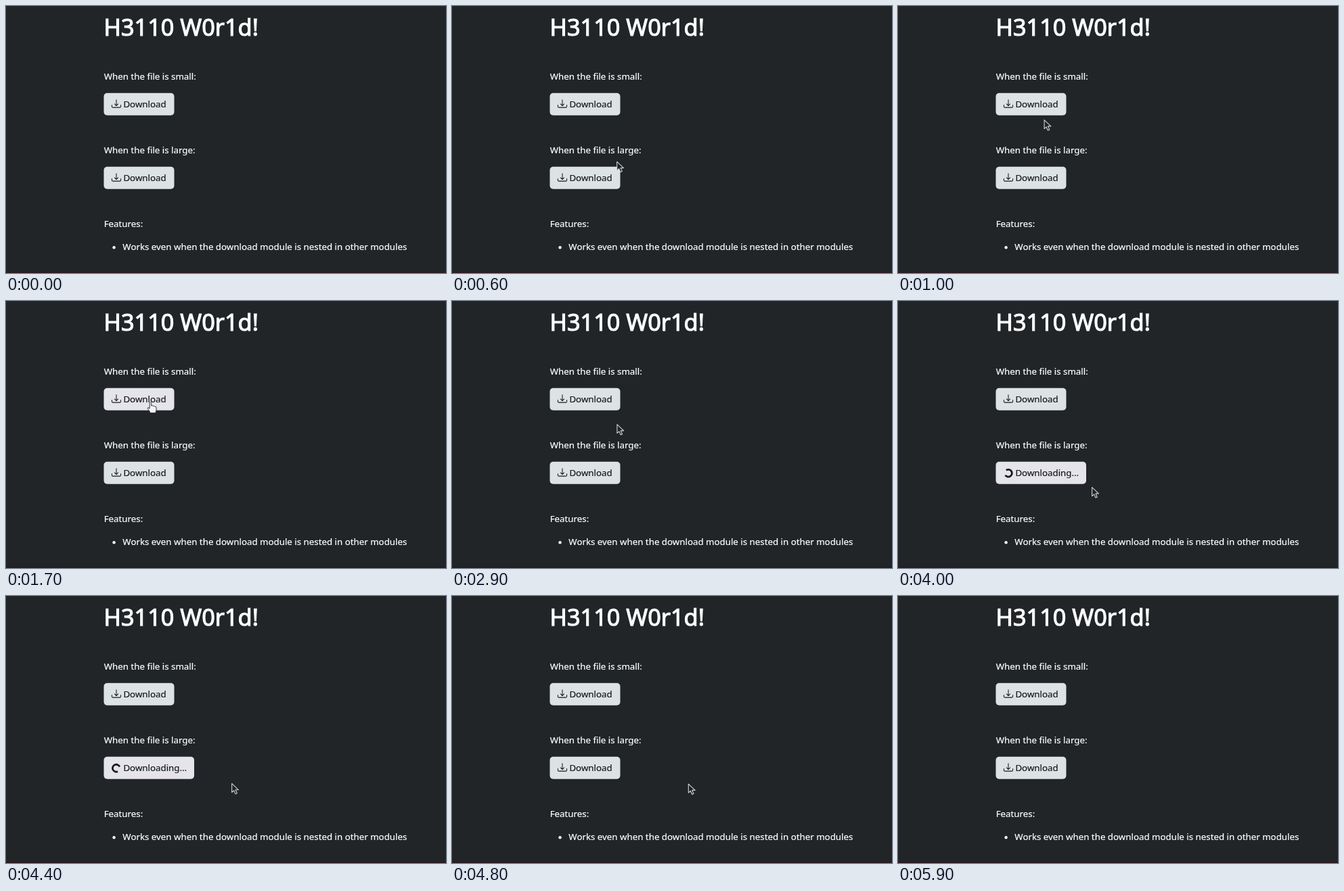
Animation of 650x395 px, one loop 6300 ms. Source, as an HTML page:

```html
<!DOCTYPE html>
<html lang="en">
<head>
<meta charset="utf-8">
<title>Download buttons</title>
<style>
  html, body { margin: 0; width: 100%; height: 100%; overflow: hidden; background: #212528; }
  svg { display: block; width: 650px; height: 395px; }
  text { font: 13.3px "Noto Sans", "Open Sans", sans-serif; fill: #fff; stroke: #fff; stroke-width: .2px; }
  .title { font-size: 34.3px; font-weight: 500; stroke-width: 1.1px; }
  .button text { fill: #181b1e; stroke: #181b1e; }
  .icon { fill: none; stroke: #181b1e; stroke-width: 1.2; stroke-linecap: round; stroke-linejoin: round; }
  .spinner { fill: none; stroke: #181b1e; stroke-width: 2.8; }
</style>
</head>
<body>
<svg viewBox="0 0 650 395">
  <defs>
    <g id="icon" class="icon" transform="translate(156 -7.5) scale(.875)">
      <path d="M.5 10.4v2.5a1.5 1.5 0 0 0 1.5 1.5h12a1.5 1.5 0 0 0 1.5-1.5v-2.5"/>
      <path d="M8 1.5v9.8M5 8.5l3 3 3-3"/>
    </g>
  </defs>
  <rect width="650" height="395" fill="#212528"/>
  <rect y="393" width="650" height="2" fill="#291b21"/>
  <text class="title" x="144.5" y="44.2">H3110 W0r1d!</text>
  <text x="144.7" y="109.2">When the file is small:</text>
  <text x="144.7" y="218.2">When the file is large:</text>
  <text x="144.7" y="327.2">Features:</text>
  <circle cx="159.6" cy="357.2" r="2.2" fill="#fff"/>
  <text x="172.3" y="361.4">Works even when the download module is nested in other modules</text>
  <g id="buttons"></g>
  <g id="cursor">
    <path id="arrow" d="M.6.6V13.6L3.6 10.9 5.9 16 8.3 14.9 6 9.9H10.4Z"
      fill="#212427" stroke="#d0d2d3" stroke-width="1.1" stroke-linejoin="round"/>
    <path id="hand" d="M-1.3.9Q0-1 1.2.9V5.6Q2.6 4 3.8 6 5.2 5 6.2 6.8 8.5 6 8.5 8V11.4Q8.5 13.2 7.3 16H-.6Q-.7 13.8-4.2 9.7-4.6 7.4-2.2 8.6L-1.3 9.7Z"
      fill="#f6f6f8" stroke="#34373b" stroke-linejoin="round"/>
  </g>
</svg>
<script>
const LOOP = 6300, STEP = 100;

// The pointer reaches each stop at `at` and stays until `leave`.
const stops = [
  { at: 300, x: 300, y: 357 },
  { at: 1000, x: 215.5, y: 168 },
  { at: 1300, leave: 2800, x: 213.5, y: 149.5 },
  { at: 2900, x: 243.3, y: 182 },
  { at: 3400, leave: 3700, x: 229, y: 249 },
  { at: 4000, x: 286, y: 275 },
  { at: 4800, leave: 5500, x: 348.7, y: 277.5 },
  { at: 5900, x: 374, y: 400 }
];

const rows = [
  { y: 145, from: 1800, to: 2100 },
  { y: 254, from: 3800, to: 4800 }
];

const $ = id => document.getElementById(id);
const show = (el, on) => el.setAttribute("visibility", on ? "visible" : "hidden");
const easeOut = k => k * (2 - k);

for (const row of rows) {
  $("buttons").insertAdjacentHTML("beforeend", `
    <g class="button" transform="translate(0 ${row.y})">
      <rect x="144.5" y="-16.2" width="104" height="33" rx="5"/>
      <use href="#icon"/>
      <path class="spinner" d="M166.7 -3.1A5.4 5.4 0 1 0 166.7 4.5"/>
      <text x="173.4" y="5"></text>
    </g>`);
  const g = $("buttons").lastElementChild;
  row.box = g.querySelector("rect");
  row.icon = g.querySelector("use");
  row.spinner = g.querySelector("path");
  row.label = g.querySelector("text");
}

function pointerAt(t) {
  const i = stops.findIndex(s => s.at > t);
  if (i < 1) return null;
  const a = stops[i - 1], b = stops[i], leave = a.leave || a.at;
  const k = easeOut(Math.max(0, (t - leave) / (b.at - leave)));
  return { x: a.x + (b.x - a.x) * k, y: a.y + (b.y - a.y) * k };
}

function draw(t) {
  const p = pointerAt(t);
  let over = false;
  for (const row of rows) {
    const busy = t >= row.from && t < row.to;
    const width = busy ? 133.5 : 104;
    const hover = p && p.x > 144 && p.x < 144 + width && Math.abs(p.y - row.y) < 17;
    over = over || hover;
    row.box.setAttribute("width", width);
    row.box.setAttribute("fill", busy || hover ? "#e4e4ea" : "#dde2e5");
    row.label.textContent = busy ? "Downloading..." : "Download";
    row.spinner.setAttribute("transform", `rotate(${190 + (t - 4000) * 0.48} 162.9 .7)`);
    show(row.icon, !busy);
    show(row.spinner, busy);
  }
  show($("arrow"), p && !over);
  show($("hand"), p && over);
  if (p) $("cursor").setAttribute("transform", `translate(${p.x} ${p.y})`);
}

const start = performance.now();
function tick() {
  const t = (performance.now() - start) % LOOP;
  draw(Math.floor(t / STEP) * STEP);
  requestAnimationFrame(tick);
}
tick();
</script>
</body>
</html>
```
